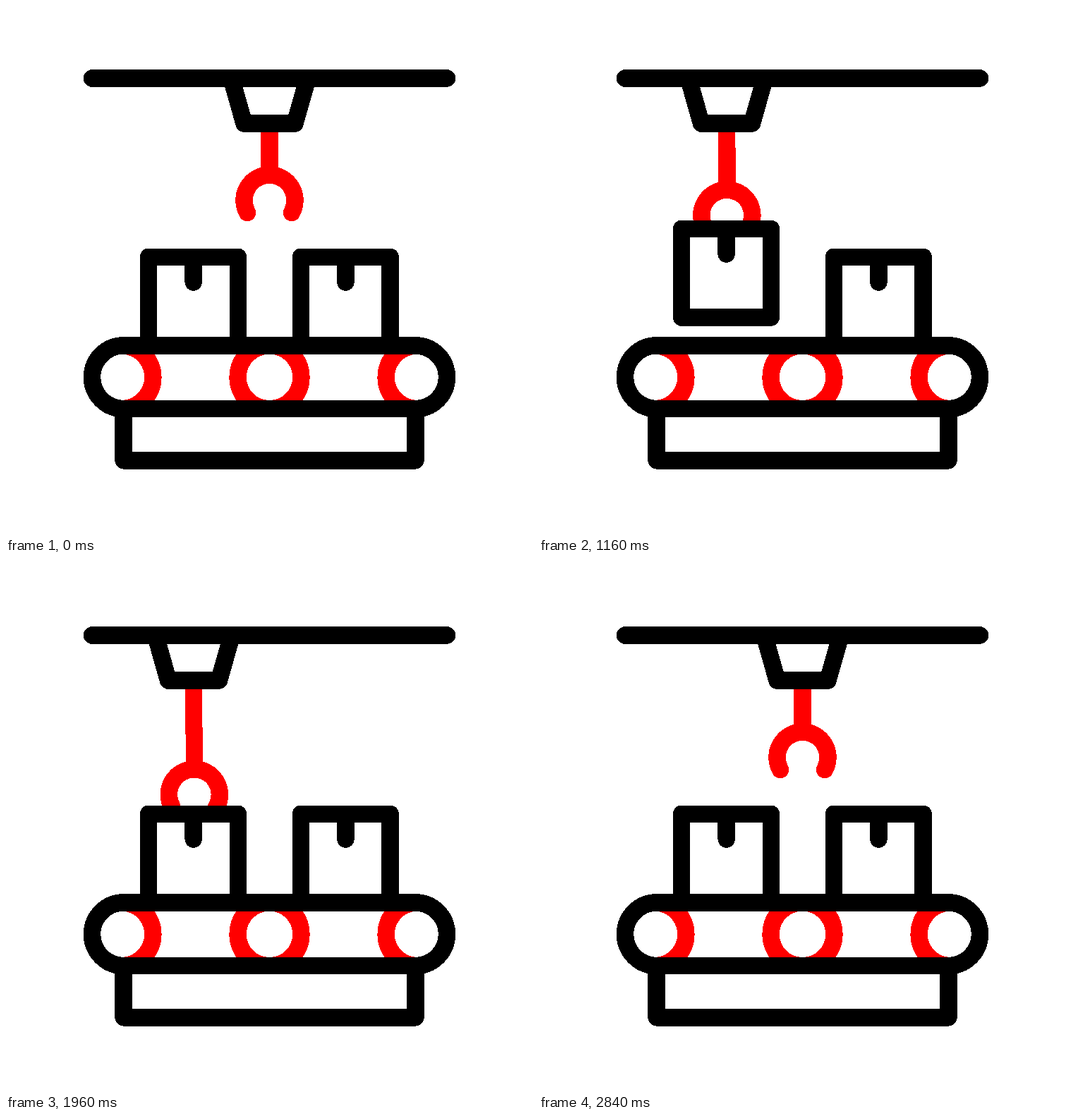
Write an HTML page that moves like this. It is 747 by 750 pixels and loops after 3000 ms.

```html
<!DOCTYPE html>
<html lang="en">
<head>
<meta charset="utf-8">
<title>Conveyor</title>
<style>
  html, body { margin: 0; width: 100%; height: 100%; overflow: hidden; background: #fff; }
  svg { display: block; width: 100%; height: 100%; }
  .line { fill: none; stroke: #000; stroke-width: 24.5; stroke-linecap: round; stroke-linejoin: round; }
  .red { stroke: #f00; }
  .flat { stroke-linecap: butt; }
</style>
</head>
<body>
<svg viewBox="0 0 747 750" shape-rendering="crispEdges">
  <defs>
    <g id="box">
      <rect x="202.2" y="355.8" width="126.6" height="125.7"/>
      <path d="M265.6 355.8V391.5"/>
    </g>
  </defs>
  <g class="line">
    <g id="crane">
      <g class="red">
        <path class="flat" d="M373.5 168V243"/>
        <g id="claw">
          <path class="flat" d="M373.5 180V240"/>
          <path d="M342 293A36 36 0 1 1 405 293"/>
        </g>
      </g>
      <path d="M319.5 103L337.5 166.5M337.5 166.5H409.5M409.5 166.5L427.5 103"/>
    </g>
    <path d="M122 102.5H625"/>
    <use id="leftBox" href="#box"/>
    <use id="rightBox" href="#box"/>
    <g class="red flat">
      <path d="M167 481.4a45 45 0 0 1 0 89.7"/>
      <circle cx="373.5" cy="526.3" r="44.9"/>
      <path d="M580 481.4a45 45 0 0 0 0 89.7"/>
    </g>
    <path d="M166.6 571.1V644.3H580.4V571.1"/>
    <rect x="122" y="481.4" width="503" height="89.7" rx="44.9"/>
  </g>
</svg>
<script>
  const LOOP = 3000, STEP = 40;
  const TRAVEL = 107.5, DROP = 61, HOP = 41;
  const GRAB = 967, RELEASE = 1867;
  const HOP_START = 1500, HOP_TIME = 460;

  const part = id => document.getElementById(id);
  const crane = part('crane'), claw = part('claw');
  const leftBox = part('leftBox'), rightBox = part('rightBox');

  const move = (el, x, y) => el.setAttribute('transform', `translate(${x.toFixed(2)} ${y.toFixed(2)})`);

  // Eased progress along cubic-bezier(.5, 0, .5, 1)
  function ease(t, start, end) {
    const x = (t - start) / (end - start);
    if (x <= 0) return 0;
    if (x >= 1) return 1;
    let low = 0, high = 1;
    for (let i = 0; i < 24; i++) {
      const u = (low + high) / 2;
      if (1.5 * u * (1 - u) + u ** 3 < x) low = u; else high = u;
    }
    return low * low * (3 - 2 * low);
  }

  function hopHeight(t) {
    const since = t - HOP_START;
    if (since < 0 || since >= 2 * HOP_TIME) return 0;
    const phase = since % HOP_TIME, half = HOP_TIME / 2;
    return HOP * ease(Math.min(phase, HOP_TIME - phase), 0, half);
  }

  function render(t) {
    const travel = ease(t, 0, 667) - ease(t, 2167, 2833);
    const reach = ease(t, 633, GRAB) - ease(t, GRAB, 1300)
                + ease(t, 1500, RELEASE) - ease(t, RELEASE, 2200);
    const held = t >= GRAB && t < RELEASE;
    move(crane, -TRAVEL * travel, 0);
    move(claw, reach, DROP * reach);
    move(leftBox, 0, held ? DROP * (reach - 1) : 0);
    move(rightBox, 215.8, -hopHeight(t));
  }

  const origin = performance.now();
  function tick() {
    const t = (performance.now() - origin) % LOOP;
    render(Math.floor(t / STEP) * STEP);
    requestAnimationFrame(tick);
  }
  tick();
</script>
</body>
</html>
```
